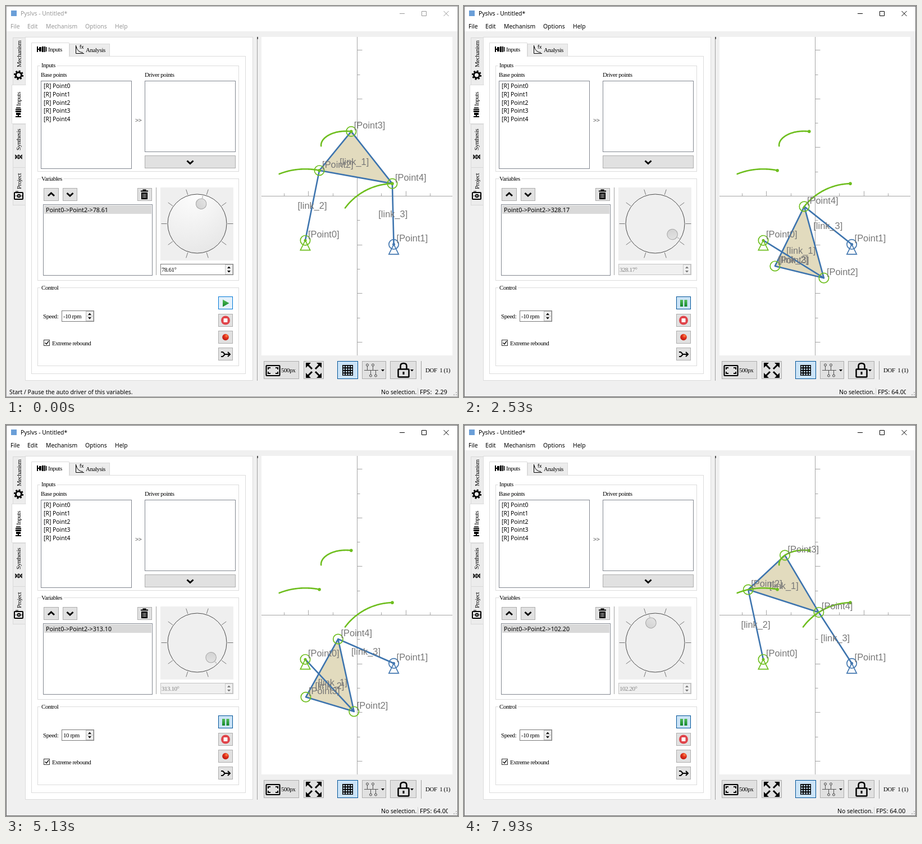
Animation, 805 px wide and 696 px high, one loop 8 s. Source, as an HTML page:

```html
<!DOCTYPE html>
<html lang="en">
<head>
<meta charset="utf-8">
<title>Linkage simulation</title>
<style>
html, body { margin: 0; width: 100%; height: 100%; overflow: hidden; background: #f0f0f0; }
svg { display: block; width: 805px; height: 696px; }
text { font: 10.4px "Noto Sans", "Open Sans", sans-serif; white-space: pre; }
.serif text, text.serif { font: 11px "Liberation Serif", serif; letter-spacing: -.45px; }
.cap { stroke: #fff; stroke-width: 6; paint-order: stroke; }
.labels text { font: 16.4px "Liberation Sans", Arial, sans-serif; fill: #777; }
#variable { font-size: 10.7px; }
#fps { font-size: 11px; }
.btn { fill: #e1e1e1; stroke: #adadad; }
.on { fill: #cce4f7; stroke: #005499; }
.hover { fill: #e5f1fb; stroke: #0078d7; }
.list { fill: #fff; stroke: #828790; }
.frame { fill: none; stroke: #dcdcdc; }
.panel { fill: #fff; stroke: #dcdcdc; }
.tab { fill: #ececec; stroke: #d9d9d9; }
.line { fill: none; stroke: #000; }
.thick { fill: none; stroke: #000; stroke-width: 3; }
.axis { fill: none; stroke: #a5a5a5; }
.chrome { --ink: #000; }
.chrome.idle { --ink: #999; }
.chrome text { fill: var(--ink); }
.chrome path { fill: none; stroke: var(--ink); }
.link { fill: #e2dbbe; stroke: #3d74ae; stroke-width: 2.6; stroke-linejoin: round; }
.trace { fill: none; stroke: #6ebe1e; stroke-width: 2.6; stroke-linecap: round; }
.joint { fill: none; stroke: #6ebe1e; stroke-width: 1.7; }
.blue { stroke: #4478b0; }
</style>
</head>
<body>
<svg viewBox="0 0 805 696">
  <defs>
    <clipPath id="view"><rect x="455" y="55" width="340" height="567"/></clipPath>
    <clipPath id="fpsClip"><rect x="730" y="678" width="57" height="18"/></clipPath>
    <radialGradient id="dialFill" cx=".17" cy="0" r="1.3" fx=".5" fy="0">
      <stop offset="0" stop-color="#fdfdfd"/><stop offset="1" stop-color="#e2e2e2"/>
    </radialGradient>
    <linearGradient id="knobFill" x2="1" y2="1">
      <stop offset="0" stop-color="#cfcfcf"/><stop offset="1" stop-color="#e6e6e6"/>
    </linearGradient>
    <linearGradient id="green" x2="0" y2="1">
      <stop offset="0" stop-color="#53bd58"/><stop offset="1" stop-color="#12862a"/>
    </linearGradient>
    <radialGradient id="red" cx=".65" cy=".3" r=".8">
      <stop offset="0" stop-color="#ff8a4a"/><stop offset=".4" stop-color="#e2301c"/><stop offset="1" stop-color="#b3140c"/>
    </radialGradient>
    <g id="motor">
      <path d="M1 0V10M2 5H5" class="line" stroke-width="2"/>
      <path d="M4 1H8V9H4ZM9 0H12V10H9ZM13 0H15V10H13ZM16 1H17.500V9H16Z"/>
    </g>
    <path id="arrows" d="M-3 -2 0 -5.500 3 -2ZM-3 2 0 5.500 3 2Z"/>
    <path id="chevron" d="M-5.500 -2.500 0 2.500 5.500 -2.500" class="thick"/>
  </defs>

  <rect width="805" height="696" fill="#f0f0f0"/>
  <rect width="805" height="45" fill="#fff"/>
  <g id="chrome" class="chrome">
    <rect x="9" y="8" width="10" height="10" fill="#6a9fd8"/>
    <text x="26" y="17">Pyslvs - Untitled*</text>
    <path d="M701 13.500H710M740.500 9.500H748.500V17.500H740.500ZM779.500 9 788.500 18M788.500 9 779.500 18"/>
    <text x="8" y="40">File</text><text x="38" y="40">Edit</text><text x="71" y="40">Mechanism</text>
    <text x="141" y="40">Options</text><text x="194" y="40">Help</text>
  </g>

  <!-- side tabs and panels -->
  <rect class="tab" x="12.500" y="56.500" width="22" height="84"/>
  <rect class="tab" x="12.500" y="210.500" width="22" height="77"/>
  <rect class="tab" x="12.500" y="287.500" width="22" height="67"/>
  <rect class="panel" x="34.500" y="55.500" width="405" height="611"/>
  <path class="panel" d="M35.500 140.500H10.500V209.500H35.500"/>
  <g class="serif">
    <text transform="translate(27 109) rotate(-90)">Mechanism</text>
    <text transform="translate(26 178) rotate(-90)">Inputs</text>
    <text transform="translate(26 257) rotate(-90)">Synthesis</text>
    <text transform="translate(27 326) rotate(-90)">Project</text>
  </g>
  <circle cx="22.500" cy="123" r="5" class="thick"/>
  <circle cx="22.500" cy="123" r="7.300" class="line" stroke-width="2.600" stroke-dasharray="2.870"/>
  <use href="#motor" transform="translate(17 198) rotate(-90)"/>
  <path class="line" stroke-width="1.200" d="M16 265C19 265 20 272 22.500 272S26 265 29 265M16 272C19 272 20 265 22.500 265S26 272 29 272M17 265V272M22.500 265V272M28 265V272"/>
  <rect x="15" y="332" width="15" height="12" rx="1" class="line" stroke-width="2"/>
  <circle cx="23" cy="338" r="2.300" class="line" stroke-width="2"/>
  <path d="M17 338H19M27 338H29M17 330H22" class="line"/>

  <rect class="tab" x="113.500" y="67.500" width="71" height="22"/>
  <rect class="panel" x="45.500" y="89.500" width="381" height="565"/>
  <path class="panel" d="M45.500 90.500V65.500H112.500V90.500"/>
  <rect x="46" y="88" width="66" height="4" fill="#fff"/>
  <use href="#motor" x="55" y="72"/>
  <path class="line" d="M124.500 70V84.500H139M125 72Q127 82 137 83"/>
  <text x="131" y="76" style="font-size:8.500px">fx</text>
  <g class="serif"><text x="75" y="81">Inputs</text><text x="142" y="82">Analysis</text></g>

  <rect class="frame" x="56.500" y="106.500" width="358" height="188"/>
  <rect class="frame" x="56.500" y="307.500" width="358" height="181"/>
  <rect class="frame" x="56.500" y="501.500" width="358" height="139"/>
  <g class="serif">
    <text class="cap" x="63" y="109">Inputs</text>
    <text class="cap" x="63" y="311">Variables</text>
    <text class="cap" x="63" y="505">Control</text>
    <text x="62" y="125.500">Base points</text><text x="247" y="125.500">Driver points</text>
    <text x="230" y="207">&gt;&gt;</text>
  </g>
  <rect class="list" x="62.500" y="133.500" width="161" height="156"/>
  <rect class="list" x="247.500" y="133.500" width="161" height="126"/>
  <g id="points"></g>
  <rect class="btn" x="247.500" y="266.500" width="161" height="22"/>
  <use href="#chevron" x="328" y="278"/>

  <!-- variables -->
  <rect class="btn" x="67.500" y="324.500" width="26" height="22"/>
  <use href="#chevron" transform="translate(80.500 335.500) scale(1 -1)"/>
  <rect class="btn" x="101.500" y="324.500" width="25" height="22"/>
  <use href="#chevron" x="114" y="335.500"/>
  <rect class="btn" x="234.500" y="324.500" width="25" height="22"/>
  <path d="M240 329.500H253M244.500 329V327.500H248.500V329" class="line" stroke-width="2"/>
  <path d="M241 332H252V344H241Z"/>
  <path d="M244 334V342M246.500 334V342M249 334V342" stroke="#ddd"/>
  <rect class="list" x="66.500" y="353.500" width="194" height="126"/>
  <rect x="68" y="355" width="191" height="15" fill="#d9d9d9"/>
  <text id="variable" x="71" y="366.500"></text>
  <path d="M267.500 323V479" stroke="#a0a0a0"/>
  <rect x="275" y="323" width="130" height="130" fill="#efefef"/>
  <path id="dialTicks" fill="none" stroke="#777"/>
  <circle id="dial" cx="340.500" cy="387.500" r="52.500" stroke="#4a4a4a"/>
  <g id="knob">
    <path d="M46 0H51" stroke="#ccc" stroke-width="2"/>
    <circle cx="36" r="9.300" fill="url(#knobFill)" stroke="#a6a6a6"/>
  </g>
  <rect id="spin" x="275.500" y="459.500" width="129" height="19"/>
  <rect x="390.500" y="460.500" width="13" height="17" fill="#f0f0f0" stroke="#c8c8c8"/>
  <use id="spinArrows" href="#arrows" x="397" y="469"/>
  <text id="angle" class="serif" x="277" y="473"></text>

  <!-- control -->
  <rect x="99.500" y="542.500" width="57" height="19" fill="#fff" stroke="#7a7a7a"/>
  <rect x="142.500" y="543.500" width="13" height="17" fill="#f0f0f0" stroke="#bbb"/>
  <path d="M143 552H155" stroke="#bbb"/>
  <use href="#arrows" x="149" y="552"/>
  <g class="serif">
    <text x="66" y="556">Speed:</text><text id="speed" x="102" y="556"></text>
    <text x="82" y="603.500">Extreme rebound</text>
  </g>
  <rect x="67.500" y="594.500" width="10" height="10" fill="#fff" stroke="#333"/>
  <path d="M69.500 599.500 72 602 76 596.500" class="line" stroke-width="1.300"/>
  <rect id="runButton" x="378.500" y="517.500" width="25" height="22"/>
  <path id="playIcon" d="M386 522.500 397.500 529 386 535.500Z" fill="url(#green)"/>
  <path id="pauseIcon" d="M385 523H390V535H385ZM392.500 523H397.500V535H392.500Z" fill="url(#green)"/>
  <rect class="btn" x="378.500" y="548.500" width="25" height="22"/>
  <circle cx="391" cy="559.500" r="8" fill="#e0444a"/><rect x="387.500" y="556" width="7" height="7" rx="1" fill="#fff"/>
  <rect class="btn" x="378.500" y="578.500" width="25" height="22"/>
  <circle cx="391" cy="589.500" r="5.800" fill="url(#red)"/>
  <rect class="btn" x="378.500" y="608.500" width="25" height="22"/>
  <path d="M383 616H386L390 620H398M383 624H386L390 620M395 616 399 620 395 624" class="line" stroke-width="2"/>

  <!-- drawing area -->
  <path d="M447.500 55V667" stroke="#a0a0a0"/><path d="M448 55V59" stroke="#555" stroke-width="2"/>
  <rect x="455" y="55" width="340" height="567" fill="#fff"/>
  <g clip-path="url(#view)">
    <path id="axes" class="axis"/>
    <g id="links" class="labels"></g>
    <g id="traces"></g>
    <g id="joints" class="labels"></g>
  </g>

  <!-- view toolbar -->
  <rect class="btn" x="459.500" y="632.500" width="62" height="31"/>
  <rect x="463.500" y="640" width="24" height="18" rx="1" class="line" stroke-width="2.200"/>
  <path d="M467 647V644H471M480 644H484V647M484 651V654H480M471 654H467V651" class="line" stroke-width="1.800"/>
  <text class="serif" x="490" y="652">500px</text>
  <rect class="btn" x="530.500" y="632.500" width="35" height="31"/>
  <path d="M534 635H543L534 644ZM562 635V644L553 635ZM534 662V653L543 662ZM562 662H553L562 653Z"/>
  <path d="M537 638 545 646M559 638 551 646M537 659 545 651M559 659 551 651" class="thick"/>
  <rect class="btn on" x="590.500" y="632.500" width="36" height="31"/>
  <rect x="599" y="639" width="19" height="19"/>
  <path d="M600.500 642H617M600.500 646.500H617M600.500 651H617M600.500 655.500H617" stroke="#cce4f7" stroke-width="2.700" stroke-dasharray="2.700 1.800"/>
  <rect class="btn" x="634.500" y="632.500" width="42" height="31"/>
  <path d="M638 648.500H663M643.500 640V648M653.500 640V648M649.500 649V656M658.500 649V656" fill="none" stroke="#555"/>
  <g fill="#e1e1e1" stroke="#444"><circle cx="643.500" cy="639" r="2"/><circle cx="653.500" cy="639" r="2"/><circle cx="649.500" cy="658" r="2"/><circle cx="658.500" cy="658" r="2"/></g>
  <rect class="btn" x="684.500" y="632.500" width="46" height="31"/>
  <path d="M668 647H674L671 650.500ZM720 647H726L723 650.500Z"/>
  <rect x="698.500" y="646.500" width="19" height="14" rx="1" class="line" stroke-width="2.500"/>
  <path d="M702.500 646V641Q702.500 636 708 636T713.500 641V646" class="line" stroke-width="2.500"/>
  <path d="M708 651V656" class="thick"/>
  <path d="M739.500 632V665" stroke="#a0a0a0"/>
  <text class="serif" x="747" y="652">DOF&#160; 1 (1)</text>

  <!-- status bar -->
  <text id="hint" x="6" y="691">Start / Pause the auto driver of this variables.</text>
  <text id="selection" y="691">No selection.</text>
  <path id="divider" d="M.5 680V693" stroke="#d0d0d0"/>
  <g clip-path="url(#fpsClip)"><text id="fps" y="691"></text></g>
  <path d="M802 687V689M798 691V693M802 691V693" stroke="#bbb" stroke-width="2"/>
  <rect id="border" x=".5" y=".5" width="804" height="695" fill="none"/>
</svg>

<script>
const $ = id => document.getElementById(id);
const attr = (el, values) => { for (const name in values) el.setAttribute(name, values[name]); };
const add = (parent, tag, values, text = '') => {
  const el = document.createElementNS('http://www.w3.org/2000/svg', tag);
  attr(el, values);
  el.textContent = text;
  return parent.appendChild(el);
};
const show = (id, on) => { $(id).style.display = on ? '' : 'none'; };

const LOOP = 8000, START = 600, STEP = 200 / 3, RAD = Math.PI / 180;
const LOW = 50.42, HIGH = 107.66; // steps at which the drive rebounds
const drive = [[1.25, 78.61], [20, 3.99], [39, -71.62], [LOW, -117.07], [56, -94.8],
  [79, -3], [94, 56.92], [HIGH, 111.49], [110, 102.2]];

function angleAt(step) {
  if (step <= drive[0][0]) return drive[0][1];
  const i = drive.findIndex(knot => knot[0] >= step);
  const [s0, a0] = drive[i - 1], [s1, a1] = drive[i];
  return a0 + (a1 - a0) * (step - s0) / (s1 - s0);
}

// Four-bar linkage: crank P0-P2, coupler P2-P4 carrying P3, rocker P4-P1.
const P0 = [533, 417.2], P1 = [690.6, 424.3];
const CRANK = 127, COUPLER = 132, ROCKER = 108.2, ALONG = 43.5, ACROSS = 78.3;
function pose(angle) {
  const p2 = [P0[0] + CRANK * Math.cos(angle * RAD), P0[1] - CRANK * Math.sin(angle * RAD)];
  const dx = P1[0] - p2[0], dy = P1[1] - p2[1], d = Math.hypot(dx, dy);
  const a = (COUPLER ** 2 - ROCKER ** 2 + d * d) / (2 * d);
  const h = Math.sqrt(Math.max(0, COUPLER ** 2 - a * a));
  const p4 = [p2[0] + (a * dx + h * dy) / d, p2[1] + (a * dy - h * dx) / d];
  const ux = (p4[0] - p2[0]) / COUPLER, uy = (p4[1] - p2[1]) / COUPLER;
  const p3 = [p2[0] + ALONG * ux + ACROSS * uy, p2[1] + ALONG * uy - ACROSS * ux];
  return [P0, P1, p2, p3, p4];
}

for (let i = 0; i < 5; i++) add($('points'), 'text', { x: 67, y: 146.3 + 14.7 * i }, `[R] Point${i}`);

let ticks = '';
for (let a = 0; a < 360; a += 36) {
  const c = Math.cos(a * RAD), s = Math.sin(a * RAD);
  ticks += `M${340.5 + 54 * c} ${387.5 + 54 * s}L${340.5 + 64 * c} ${387.5 + 64 * s}`;
}
attr($('dialTicks'), { d: ticks });

let axes = 'M455 338.5H795M625.5 55V622';
for (let i = -6; i <= 6; i++) {
  const size = i % 2 ? 5 : 9, at = 43.3 * i;
  axes += `M625.5 ${Math.round(338 + at) + .5}h${size}M${Math.round(625 + at) + .5} 338.5v${-size}`;
}
attr($('axes'), { d: axes });

const path = Array.from({ length: 61 }, (_, i) => pose(111.4 + (78.61 - 111.4) * i / 60));
for (const n of [2, 3, 4]) {
  add($('traces'), 'polyline', { class: 'trace', points: path.map(p => p[n]).join(' ') });
  const [cx, cy] = path[60][n];
  add($('traces'), 'circle', { cx, cy, r: 2.8, fill: '#6ebe1e' });
}

const links = [[2, 4, 3], [0, 2], [1, 4]].map((ends, i) => ({
  ends,
  shape: add($('links'), 'polygon', { class: 'link' }),
  label: add($('links'), 'text', { 'text-anchor': 'middle' }, `[link_${i + 1}]`)
}));

const joints = [0, 1, 2, 3, 4].map(n => {
  const g = add($('joints'), 'g', {}), blue = n === 1;
  const kind = blue ? 'joint blue' : 'joint';
  add(g, 'circle', { r: 8.7, class: kind });
  if (n < 2) {
    add(g, 'path', { d: 'M0 0 -8.7 17.5H8.7Z', class: kind });
    add(g, 'circle', { r: 2.5, fill: blue ? '#4478b0' : '#6ebe1e' });
  }
  add(g, 'text', { x: 5, y: -5 }, `[Point${n}]`);
  return g;
});

function render(t) {
  const running = t >= START;
  const step = running ? Math.min(110, Math.floor((t - START + 4) / STEP)) : 0;
  const angle = angleAt(step), points = pose(angle);
  const value = ((angle + 360) % 360).toFixed(2);

  for (const { ends, shape, label } of links) {
    const pts = ends.map(n => points[n]);
    const mean = k => pts.reduce((sum, p) => sum + p[k], 0) / pts.length;
    attr(shape, { points: pts.join(' ') });
    attr(label, { x: mean(0), y: mean(1) + 6 });
  }
  joints.forEach((g, n) => attr(g, { transform: `translate(${points[n]})` }));

  $('variable').textContent = `Point0->Point2->${value}`;
  $('angle').textContent = `${value}°`;
  $('speed').textContent = step > LOW && step < HIGH ? '10 rpm' : '-10 rpm';
  attr($('knob'), { transform: `translate(340.5 387.5) rotate(${-angle})` });

  attr($('chrome'), { class: running ? 'chrome' : 'chrome idle' });
  attr($('border'), { stroke: running ? '#6b6b6b' : '#a0a0a0' });
  attr($('dial'), { fill: running ? '#efefef' : 'url(#dialFill)' });
  attr($('spin'), { fill: running ? '#f0f0f0' : '#fff', stroke: running ? '#c4c4c4' : '#7a7a7a' });
  attr($('angle'), { fill: running ? '#808080' : '#000' });
  attr($('spinArrows'), { fill: running ? '#777' : '#000' });
  attr($('runButton'), { class: running ? 'btn on' : 'btn hover' });
  show('playIcon', !running);
  show('pauseIcon', running);
  show('hint', t < 1670);

  const narrow = !running || (t >= 2330 && t < 6600);
  attr($('selection'), { x: narrow ? 668 : 665 });
  attr($('divider'), { transform: `translate(${narrow ? 733 : 730})` });
  attr($('fps'), { x: narrow ? 737 : 734 });
  $('fps').textContent = running ? 'FPS: 64.00' : 'FPS:  2.29';
}

const begin = performance.now();
function tick() {
  render((performance.now() - begin) % LOOP);
  requestAnimationFrame(tick);
}
tick();
</script>
</body>
</html>
```
